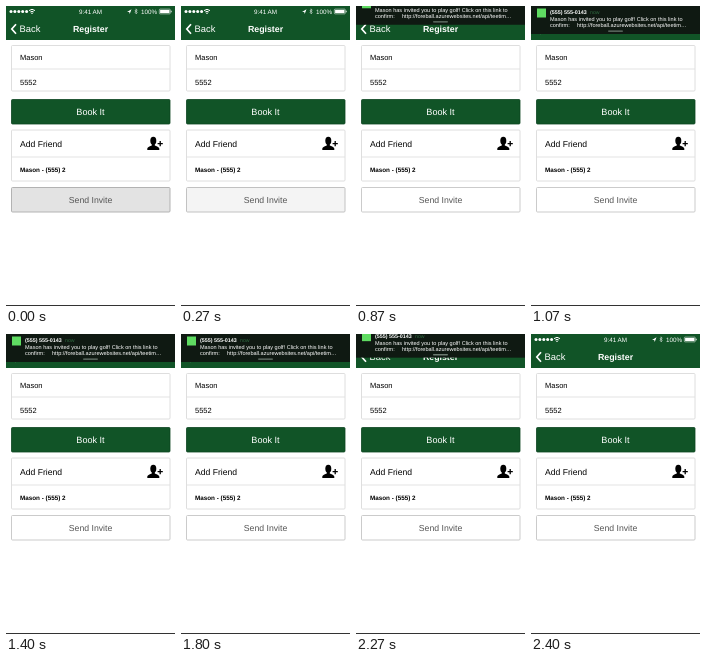
Recreate the animation shown at these times as an HTML page. Size 169x300 px, loop 2470 ms.

```html
<!DOCTYPE html>
<html lang="en">
<head>
<meta charset="utf-8">
<title>Register</title>
<style>
  html, body { margin: 0; width: 100%; height: 100%; overflow: hidden; background: #fff; }
  svg { display: block; width: 100%; height: 100%; }
  text { font-family: "Liberation Sans", Arial, sans-serif; text-rendering: geometricPrecision; white-space: pre; }
  .mid { text-anchor: middle; }
  .bold { font-weight: bold; }
  .card { fill: #fff; stroke: #d6d6d6; stroke-width: .8; }
  .rule { stroke: #dcdcdc; stroke-width: .8; }
</style>
</head>
<body>
<svg viewBox="0 0 169 300">
  <rect width="169" height="300" fill="#fff"/>

  <g id="header" fill="#fff">
    <rect width="169" height="34" fill="#115427"/>
    <g id="dots"></g>
    <g fill="none" stroke="#fff" stroke-width="1">
      <path d="M23 4.6Q26 2 29 4.6M24.3 6Q26 4.5 27.7 6"/>
    </g>
    <circle cx="26" cy="7.3" r=".8"/>
    <text class="mid" x="84.5" y="7.6" font-size="6.3">9:41 AM</text>
    <path d="M121 6L125.5 3.2L123.7 8L123.2 6Z"/>
    <path d="M128.8 4L131.2 6.6L130 8V2.8L131.2 4.1L128.8 6.8" fill="none" stroke="#fff" stroke-width=".5"/>
    <text x="135" y="7.6" font-size="6.3">100%</text>
    <rect x="153.3" y="3.1" width="11" height="4.8" rx=".8" fill="none" stroke="#fff" stroke-width=".5"/>
    <rect x="154.1" y="3.9" width="9.4" height="3.2"/>
    <rect x="164.8" y="4.7" width=".8" height="1.6"/>
    <path d="M10 18.3L5.8 23L10 27.7" fill="none" stroke="#fff" stroke-width="1.7"/>
    <text x="13.5" y="26" font-size="9.4">Back</text>
    <text class="mid bold" x="84.5" y="26" font-size="8.8">Register</text>
  </g>

  <rect class="card" x="5.5" y="39.5" width="158.5" height="45.5" rx="1"/>
  <path class="rule" d="M5.5 63H164"/>
  <text x="14" y="54" font-size="7.5">Mason</text>
  <text x="14" y="78.6" font-size="7.5">5552</text>

  <rect x="5.5" y="93.5" width="158.5" height="24.5" rx="1" fill="#115427" stroke="#0c4520" stroke-width=".8"/>
  <text class="mid" x="84.5" y="108.8" font-size="9.1" fill="#fff">Book It</text>

  <rect class="card" x="5.5" y="124" width="158.5" height="51" rx="1"/>
  <path class="rule" d="M5.5 151H164"/>
  <text x="14" y="140.8" font-size="8.6">Add Friend</text>
  <g id="person">
    <ellipse cx="147.3" cy="134.7" rx="3" ry="3.9"/>
    <path d="M141.3 144V142.4Q141.5 140.8 145.8 139.4V137H148.8V139.4Q153 140.8 153.3 142.4V144Z"/>
    <path d="M151.6 137.6H156.8M154.2 135V140.2" stroke="#000" stroke-width="1.3"/>
  </g>
  <text class="bold" x="14" y="165.6" font-size="6.3">Mason - (555) 2</text>

  <rect id="invite" x="5.5" y="181.5" width="158.5" height="24.5" rx="1" stroke-width=".9"/>
  <text class="mid" x="84.5" y="197" font-size="8.7" fill="#555">Send Invite</text>

  <rect y="299" width="169" height="1" fill="#333"/>

  <g id="banner" fill="#fff" font-size="5.55">
    <rect y="-2" width="169" height="30" fill="#0f1912"/>
    <rect x="6" y="2.5" width="9" height="9" fill="#5fdc62"/>
    <text class="bold" x="19" y="8.4" font-size="5.4">(555) 555-0143</text>
    <text x="59" y="8.4" font-size="5.2" fill="#2f6a40">now</text>
    <text x="19" y="15">Mason has invited you to play golf! Click on this link to</text>
    <text x="19" y="21.2">confirm:</text>
    <text x="46" y="21.2">http://foreball.azurewebsites.net/api/teetim…</text>
    <rect x="77" y="24.4" width="15" height="1.4" rx=".7" fill="#6c7b70"/>
  </g>
</svg>
<script>
  const LOOP = 2470, HEIGHT = 28;
  const byId = id => document.getElementById(id);
  const invite = byId("invite"), banner = byId("banner");
  const clamp = x => Math.min(1, Math.max(0, x));
  const progress = (x, from, to) => clamp((x - from) / (to - from));
  const smooth = x => x * x * (3 - 2 * x);
  const gray = v => `rgb(${v},${v},${v})`;

  byId("dots").innerHTML = [0, 1, 2, 3, 4]
    .map(i => `<circle cx="${5 + i * 3.9}" cy="5.5" r="1.5"/>`).join("");

  function draw(ms) {
    const step = Math.floor((ms + 4) * 0.015); // 15 pictures a second

    const release = 1 - (1 - progress(step, 1, 9)) ** 2;
    invite.setAttribute("fill", gray(Math.round(227 + 28 * release)));
    invite.setAttribute("stroke", gray(Math.round(172 + 26 * release)));

    const shown = smooth(progress(step, 9.8, 15)) - progress(step, 32.5, 36) ** 2.2;
    banner.setAttribute("transform", `translate(0 ${(shown - 1) * HEIGHT})`);
    banner.setAttribute("visibility", shown > 0 ? "visible" : "hidden");
  }

  const start = performance.now();
  function tick() {
    draw((performance.now() - start) % LOOP);
    requestAnimationFrame(tick);
  }
  tick();
</script>
</body>
</html>
```
